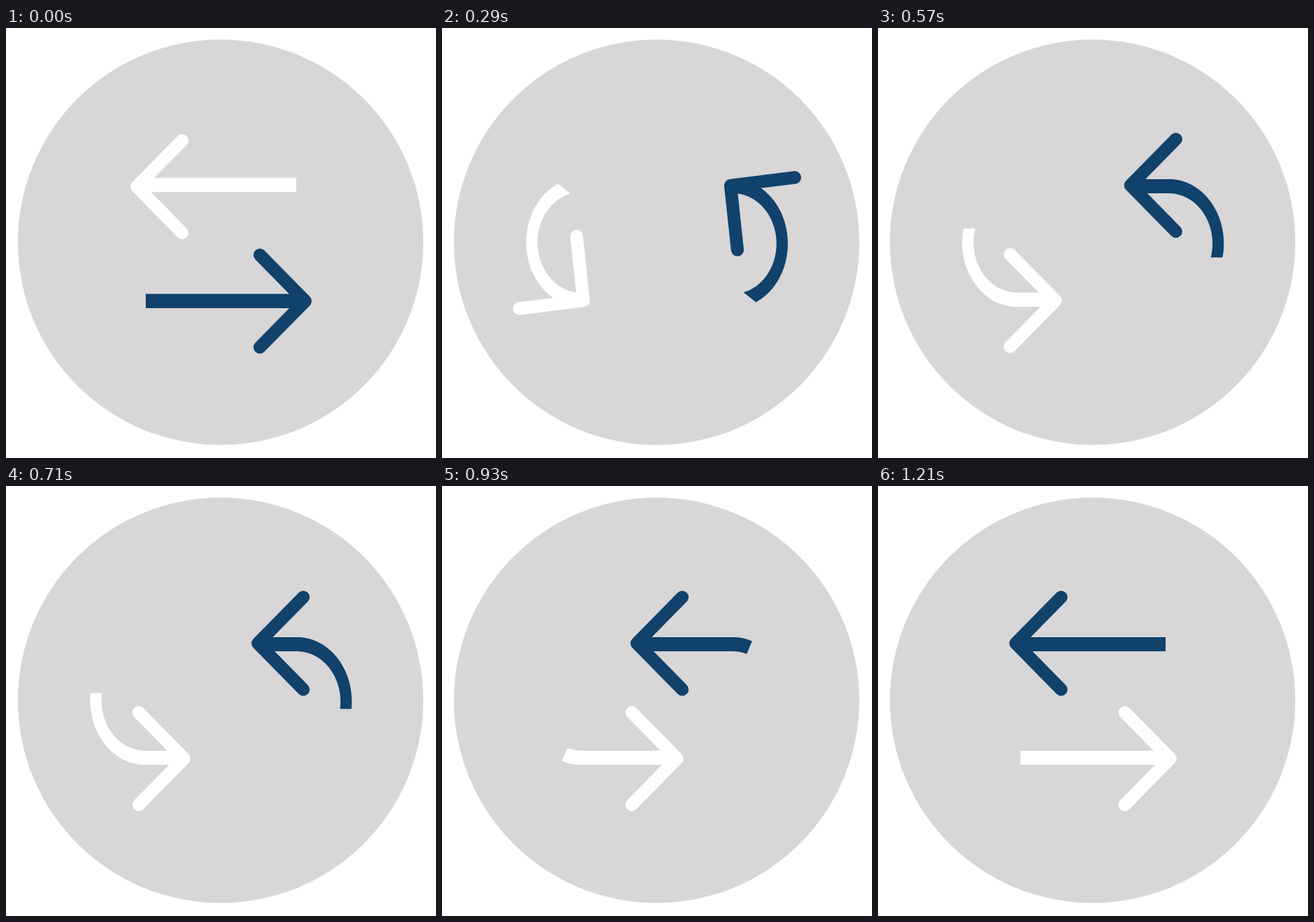
Write an HTML page with a canvas that moves like this. It is 640x640 px and loops after 3000 ms.

```html
<!DOCTYPE html>
<html>
<head>
<meta charset="utf-8">
<style>
  html, body { margin: 0; width: 100%; height: 100%; overflow: hidden; background: #fff; }
  canvas { display: block; width: 640px; height: 640px; }
</style>
</head>
<body>
<canvas id="stage" width="640" height="640"></canvas>
<script>
const ctx = document.getElementById('stage').getContext('2d');
const LOOP = 3000, LAST = 17;

// The track: a line to the left, half an ellipse down, a line to the right.
// Distance s is 0 where the curve begins and ARC where it ends.
const CX = 207, CY = 319.1, RX = 73.25, RY = 85.4, ARC = 249.5;

const clamp = u => Math.min(1, Math.max(0, u));
const easeOut = (u, power) => 1 - (1 - clamp(u)) ** power;
const easeInOut = u => {
  u = clamp(u);
  return u < 0.5 ? 8 * u ** 4 : 1 - 8 * (1 - u) ** 4;
};

// Point on the track; side runs from -1 (inner edge) to 1 (outer edge)
function at(s, side = 0) {
  const curve = clamp(s / ARC), a = curve * Math.PI;
  return [
    CX - (RX + 8.45 * side) * Math.sin(a) + Math.abs(s - curve * ARC),
    CY - (RY + 10.6 * side) * Math.cos(a)
  ];
}

function heading(s) {
  const [x0, y0] = at(s - 0.5), [x1, y1] = at(s + 0.5);
  return Math.atan2(y1 - y0, x1 - x0);
}

// Keep only what lies ahead of the tail's cut
function clipTail([x, y], angle) {
  ctx.translate(x, y);
  ctx.rotate(angle);
  ctx.beginPath();
  ctx.rect(0, -700, 700, 1400);
  ctx.rotate(-angle);
  ctx.translate(-x, -y);
  ctx.clip();
}

function drawShaft(from, to) {
  ctx.beginPath();
  for (let s = from; s < to; s++) ctx.lineTo(...at(s, 1));
  for (let s = to; s > from; s--) ctx.lineTo(...at(s, -1));
  ctx.fill();
}

function drawHead(x, y, angle) {
  ctx.save();
  ctx.translate(x, y);
  ctx.rotate(angle);
  ctx.beginPath();
  ctx.moveTo(-67.6, -68.7);
  ctx.lineTo(0, 0);
  ctx.lineTo(-67.6, 68.7);
  ctx.stroke();
  ctx.restore();
}

function drawArrow(color, head, tail, angle, drop) {
  const cut = tail < 205 ? Math.min(Math.PI, angle + Math.PI / 2) : heading(tail);
  const [x, y] = at(head);
  ctx.fillStyle = ctx.strokeStyle = color;
  ctx.save();
  clipTail(at(tail), cut);
  drawShaft(tail - 30, head - 10);
  ctx.restore();
  drawHead(x, y + drop, angle);
}

function draw(now) {
  // 14 steps a second
  const step = Math.min(LAST, Math.floor((now % LOOP + 4.3) * 0.014));
  const head = 13.5 + 294 * easeOut(step / 9.3, 3) + 170 * easeInOut((step - 9.3) / 7.4);
  const tail = -225 + 342 * easeOut(step / 14, 4) + 137.5 * easeOut((step - 10) / 7, 2.6);
  const angle = heading(head - 51); // the head turns later than the track

  ctx.fillStyle = '#fff';
  ctx.fillRect(0, 0, 640, 640);
  ctx.fillStyle = '#d8d6d7';
  ctx.beginPath();
  ctx.arc(319.4, 318.9, 301.7, 0, 2 * Math.PI);
  ctx.fill();

  ctx.lineWidth = 19;
  ctx.lineCap = ctx.lineJoin = 'round';
  drawArrow('#fff', head, tail, angle, 1.2);

  // The second arrow is the first one turned by half a circle
  ctx.save();
  ctx.translate(640, 640);
  ctx.rotate(Math.PI);
  drawArrow('#10426b', head, tail, angle, 1.4 * Math.cos(angle));
  ctx.restore();
}

const start = performance.now();
function tick() {
  draw(performance.now() - start);
  requestAnimationFrame(tick);
}
tick();
</script>
</body>
</html>
```
